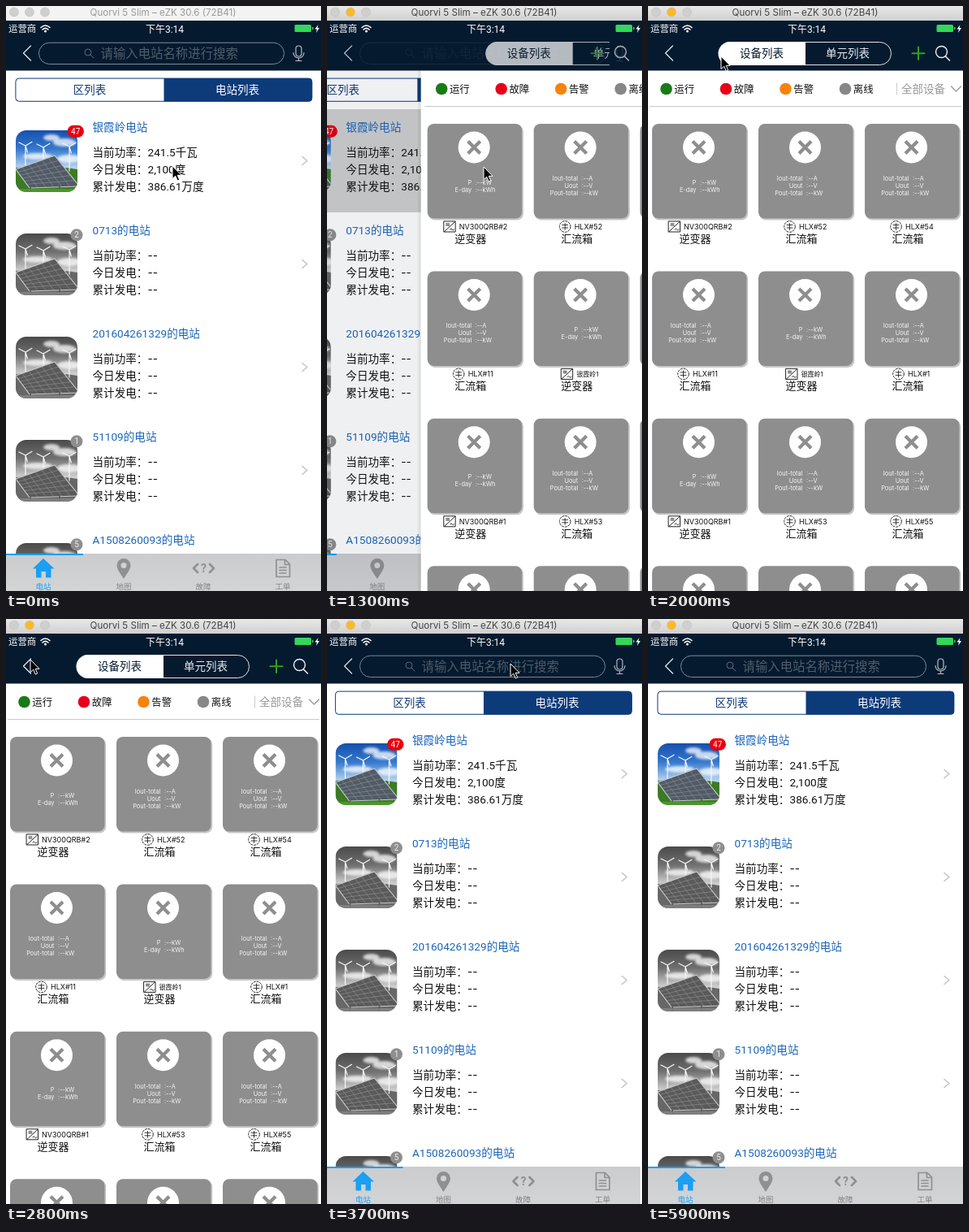
Write an HTML page that moves like this. It is 388 by 720 pixels and loops after 6000 ms.

```html
<!DOCTYPE html>
<html lang="zh-CN">
<head>
<meta charset="utf-8">
<title>Station list</title>
<style>
html, body { margin: 0; width: 100%; height: 100%; overflow: hidden; background: #fff }
svg { display: block; font-family: Roboto, "Noto Sans CJK SC", "Noto Sans CJK", sans-serif }
.ui { font-family: Inter, "Noto Sans CJK SC", "Noto Sans CJK", sans-serif }
.line { fill: none; stroke-linecap: round; stroke-linejoin: round }
.grey { filter: grayscale(1) }
.soft { filter: blur(1.6px) }
</style>
</head>
<body>
<svg id="stage" width="388" height="720" viewBox="0 0 388 720"></svg>
<script>
const NAVY = '#051a2f', BLUE = '#0d3b7a', GREY = '#8e8e8e';

const text = (x, y, s, size, fill = '#111', extra = '') =>
  `<text x="${x}" y="${y}" font-size="${size}" fill="${fill}" ${extra}>${s}</text>`;
const mid = (x, y, s, size, fill, extra = '') => text(x, y, s, size, fill, `text-anchor="middle" ${extra}`);
const end = (x, y, s, size, fill, extra = '') => text(x, y, s, size, fill, `text-anchor="end" ${extra}`);
const rect = (x, y, w, h, fill, extra = '') =>
  `<rect x="${x}" y="${y}" width="${w}" height="${h}" fill="${fill}" ${extra}/>`;
const dot = (x, y, r, fill, extra = '') => `<circle cx="${x}" cy="${y}" r="${r}" fill="${fill}" ${extra}/>`;
const line = (d, stroke, width = 1) => `<path class="line" d="${d}" stroke="${stroke}" stroke-width="${width}"/>`;
const group = (x, y, body, extra = '') => `<g transform="translate(${x} ${y})" ${extra}>${body}</g>`;

const turbine = (x, y, r, foot) =>
  line(`M${x} ${y}V${foot}M${x} ${y}l${-r} ${-r * .5}M${x} ${y}l${r} ${-r * .6}M${x} ${y}l${r * .3} ${r}`, '#f4f8ff', 1.2);
const cloud = (x, y, rx, ry) => `<ellipse cx="${x}" cy="${y}" rx="${rx}" ry="${ry}" fill="#fff" opacity=".75"/>`;

function photo() {
  let cells = '';
  for (let i = 1; i < 6; i++) {
    const k = i / 6;
    cells += `M${48 * k} ${48 - 17 * k}L${17 + 59 * k} ${70 - 2 * k}M${17 * k} ${48 + 22 * k}L${48 + 28 * k} ${31 + 37 * k}`;
  }
  return rect(0, 0, 76, 76, 'url(#sky)') +
    `<g class="soft">${cloud(44, 9, 10, 4) + cloud(60, 15, 14, 5) + cloud(27, 32, 18, 4) + cloud(66, 35, 15, 5)}</g>` +
    '<path d="M0 46Q40 42 76 48V76H0Z" fill="#3c7a24"/>' +
    turbine(12, 19, 8, 47) + turbine(34, 21, 8, 37) + turbine(66, 20, 8, 50) +
    '<path d="M0 48L48 31 76 66V69L17 71Z" fill="#525b65"/>' +
    line(cells, '#8a949e', .6) + line('M0 48L48 31 76 66M0 48L17 71 76 69', '#c3cad0', 1.2) +
    line('M18 71V76M54 70V76', '#565d58', 2) + rect(0, 72, 76, 4, '#56ab2d', 'opacity=".6"');
}

function listRow(title, badge, values, i) {
  const labels = ['当前功率：', '今日发电：', '累计发电：'];
  let s = group(12, 153, '<use href="#photo"/>', i ? 'class="grey"' : '');
  if (badge) {
    s += i ? dot(87, 154.7, 7.5, GREY) : rect(75.5, 146.7, 20.5, 15, '#e8000f', 'rx="7.5"');
    s += mid(i ? 87 : 85.7, 158, badge, 10, i ? '#eee' : '#fff');
  }
  s += text(106.5, 154, title, 13.6, '#1c66b8');
  labels.forEach((label, n) => {
    const y = 185 + 21 * n;
    s += text(106.5, y, label, 13.6) + text(174.5, y, values ? values[n] : '--', 13.6, '#111', values ? '' : 'class="ui"');
  });
  return group(0, 127 * i, s + line('M365 185.5L370.8 190.5 365 195.5', '#c4c4c8', 1.6));
}

function tabBar() {
  const ink = '#909092';
  const names = ['电站', '地图', '故障', '工单'];
  return rect(0, 674, 388, 46, 'url(#bar)') + rect(0, 674, 95, 2, '#1a9ff2') +
    '<path d="M46 680L59.500 692.500H55.500V703.500H49V696H43.500V703.500H37V692.500H33Z" fill="#1a9ff2"/>' +
    `<path d="M145 705C140 697 136.500 693 136.500 688.500a8.500 8.500 0 0 1 17 0C153.500 693 150 697 145 705Z" fill="${ink}"/>` +
    dot(145, 688.500, 3.500, '#d0d1d3') +
    line('M236 687L231 692 236 697M251 687L256 692 251 697', ink, 2.6) + mid(243.5, 697, '?', 14, ink, 'font-weight="700"') +
    line('M333 681.500H344L349.500 687V702.500H333ZM343.500 682V687.500H349M337 691H345M337 694.500H345M337 698H345', ink, 1.7) +
    names.map((s, i) => mid([46, 145, 243, 341][i], 718.3, s, 9.5, i ? '#858587' : '#1a9ff2')).join('');
}

function listPage() {
  const rows = [
    ['银霞岭电站', '47', ['241.5千瓦', '2,100度', '386.61万度']],
    ['0713的电站', '2'], ['201604261329的电站', ''], ['51109的电站', '1'], ['A1508260093的电站', '5']
  ];
  return rect(0, 79, 388, 641, '#fff') + rect(0, 127, 388, 127, '#cfcfcf', 'id="picked"') +
    rect(11.9, 89.1, 365, 28.2, '#fff', `rx="4" stroke="${BLUE}"`) +
    `<path d="M194.500 89H373a4 4 0 0 1 4 4V113.500a4 4 0 0 1-4 4H194.500Z" fill="${BLUE}"/>` +
    mid(103, 108, '区列表', 13.5, '#123a75') + mid(285, 108, '电站列表', 13.5, '#fff') +
    rows.map(([title, badge, values], i) => listRow(title, badge, values, i)).join('') + tabBar() +
    rect(0, 79, 388, 641, '#00103a', 'id="dim"');
}

function card(device, i) {
  const [name, width, inverter] = device;
  const readings = inverter ? [['P', 'kW'], ['E-day', 'kWh']] : [['Iout-total', 'A'], ['Uout', 'V'], ['Pout-total', 'kW']];
  const left = 58 - (width + 19) / 2, top = inverter ? 74.5 : 70;
  let s = rect(1.2, 1.5, 117, 117, '#c6c6c6', 'rx="8"') + rect(0, 0, 116.5, 116.5, GREY, 'rx="8"') +
    dot(57.5, 29, 19.5, '#fff') + `<path d="M50 21.500L65 36.500M65 21.500L50 36.500" stroke="${GREY}" stroke-width="4.2"/>`;
  readings.forEach(([label, unit], n) => {
    s += end(54.5, top + 9 * n, label, 7.4, '#f4f4f4', 'class="ui"') +
      text(59, top + 9 * n, ':--' + unit, 7.4, '#f4f4f4', 'class="ui"');
  });
  s += group(left, 119.5, inverter
    ? line('M.5 .5H14.500V13.500H.5ZM1 13L14 1M3 3.500H7M3 5.500H7M8 10.500q1.500-2 2.500 0t2.500 0', '#222')
    : dot(7.5, 7, 6.8, 'none', 'stroke="#222" stroke-dasharray="3 1"') + line('M4 5H11M4 8.500H11M7.500 3V11', '#222', .9));
  s += text(left + 19, 130, name, inverter && width < 40 ? 8 : 9, '#111', 'class="ui"') +
    mid(53, 146, inverter ? '逆变器' : '汇流箱', 13);
  return group(5 + 131 * (i % 3), 145 + 181.4 * Math.floor(i / 3), s);
}

function detailPage() {
  const box = n => ['HLX#' + n, n > 9 ? 35 : 29, false];
  const inverter = n => ['NV300QRB#' + n, 57, true];
  const devices = [inverter(2), box(52), box(54), box(11), ['银霞岭1', 30, true], box(1),
    inverter(1), box(53), box(55), box(12), box(13), box(14)];
  const legend = [['运行', '#1b7a18'], ['故障', '#e60019'], ['告警', '#f5840c'], ['离线', '#878787']];
  return rect(-8, 79, 5, 641, 'url(#edge)', 'id="shadow"') + rect(-3, 79, 400, 641, '#fff') +
    legend.map(([s, c], i) => dot(22.5 + 73.5 * i, 102, 7.3, c) + text(32.3 + 73.5 * i, 106.8, s, 12.4)).join('') +
    line('M306.500 95V109', '#ccc') + text(312, 107, '全部设备', 13.5, '#999') +
    line('M373.500 99L379.500 105 385.500 99', '#999', 1.3) + rect(2, 123, 384, 1.2, '#cdcdcd') +
    devices.map(card).join('');
}

const back = line('M30.500 49L21.500 58 30.500 67', '#dfe5ec', 1.3);

const searchNav = () => back +
  rect(40.5, 45.2, 302, 26.3, 'none', 'rx="13" stroke="#7c8a9a"') +
  dot(101, 57, 4, 'none', 'stroke="#5c6977"') + line('M104 60L108 64', '#5c6977') +
  text(116.5, 63.7, '请输入电站名称进行搜索', 15.4, '#505d6b') +
  rect(357, 49, 7, 13, 'none', 'rx="3.5" stroke="#b4bdc8" stroke-width="1.2"') +
  line('M354 57.500a6.500 6.500 0 0 0 13 0M360.500 64V67.500M357 67.500H364', '#b4bdc8', 1.2);

const detailNav = () => back +
  '<g clip-path="url(#navClip)"><g id="tabs">' +
  rect(87.5, 44.5, 212, 28, 'none', 'rx="14" stroke="#dfe5ec"') +
  '<path d="M194 44H101a14.500 14.500 0 0 0 0 29H194Z" fill="#fff"/>' +
  mid(140, 63, '设备列表', 13.5, NAVY) + mid(246, 63, '单元列表', 13.5, '#e8edf2') + '</g></g>' +
  line('M333 50.500V66M325.500 58.200H340.500', '#30a022', 2) +
  dot(361.5, 56.5, 7, 'none', 'stroke="#eef2f6" stroke-width="1.4"') + line('M366.500 62L371.500 67', '#eef2f6', 1.5);

const statusBar = () =>
  text(3, 32.3, '运营商', 11.4, '#fff') + mid(195.5, 32.5, '下午3:14', 12, '#fff') +
  line('M43 26.500Q48.500 21.500 54 26.500M45 29Q48.500 25.800 52 29', '#fff', 1.6) + dot(48.5, 31, 1.5, '#fff') +
  rect(355.5, 23, 20.5, 9, '#35d65b', 'rx="1.5"') + rect(377, 26, 1.5, 3, '#35d65b') +
  '<path d="M384.500 23L380.500 28.500H383L382 33 386 27H383.500Z" fill="#fff"/>';

const titleBar = () => rect(0, 0, 388, 18, '#f3f3f3') + rect(0, 0, 388, 18, 'url(#chrome)', 'id="focus"') +
  [10, 29, 48].map((x, i) => dot(x, 7.5, 5.5, '#cfcfcf', `stroke="#c0c0c0" stroke-width=".6" ${i === 1 ? 'id="light"' : ''}`)).join('') +
  mid(193.5, 12, 'Quorvi 5 Slim – eZK 30.6 (72B41)', 11.6, '#999', 'class="ui" id="caption"');

const gradient = (id, x2, y2, ...stops) => `<linearGradient id="${id}" x2="${x2}" y2="${y2}">` +
  stops.map(([at, c, o = 1]) => `<stop offset="${at}" stop-color="${c}" stop-opacity="${o}"/>`).join('') + '</linearGradient>';

const $ = id => document.getElementById(id);
$('stage').innerHTML = '<defs>' +
  gradient('sky', 0, 1, [0, '#1650ae'], [.3, '#3478cc'], [.6, '#b5d3ee']) +
  gradient('chrome', 0, 1, [0, '#e8e8e8'], [1, '#d0d0d0']) +
  gradient('bar', 0, 1, [0, '#cbccce'], [1, '#d3d4d6']) +
  gradient('edge', 1, 0, [0, '#000', 0], [1, '#000', .15]) +
  '<clipPath id="round"><rect width="76" height="76" rx="13"/></clipPath>' +
  '<clipPath id="navClip"><rect x="0" y="40" width="348" height="36"/></clipPath>' +
  `<g id="photo" clip-path="url(#round)">${photo()}</g></defs>` +
  `<g id="list">${listPage()}</g><g id="detail">${detailPage()}</g>` +
  rect(0, 18, 388, 61.5, NAVY) + `<g id="searchNav">${searchNav()}</g><g id="detailNav">${detailNav()}</g>` +
  statusBar() + titleBar() +
  '<path id="cursor" d="M0 0V15.500L3.700 12.200 6.200 18 8.700 17 6.200 11.300H11Z" fill="#000" stroke="#fff" stroke-width="1"/>';

// Pointer stops: time, x, y
const stops = [[0, 205, 197], [700, 193, 198], [1400, 193, 198], [2000, 90, 62], [2600, 30, 50],
  [3300, 30, 50], [3700, 226, 55], [4300, 179, 59], [5000, 179, 59], [5600, 179, -25], [6000, 179, -25]];
const PUSH = 1180, POP = 3265, RATE = .01;

function pointer(t) {
  const i = stops.findIndex(s => s[0] > t);
  const [t0, x0, y0] = stops[i - 1], [t1, x1, y1] = stops[i];
  const k = (t - t0) / (t1 - t0), e = k * k * (3 - 2 * k);
  return [x0 + (x1 - x0) * e, y0 + (y1 - y0) * e];
}

// 0 shows the list, 1 the detail page
function progress(t) {
  if (t < PUSH || t > 4000) return 0;
  if (t < POP) return t > 1950 ? 1 : 1 - Math.exp(-RATE * (t - PUSH));
  return Math.exp(-RATE * (t - POP));
}

const move = (id, x, y = 0) => $(id).setAttribute('transform', `translate(${x} ${y})`);
const fade = (id, o) => $(id).setAttribute('opacity', o);

function draw(t) {
  const q = progress(t), pushing = t < POP, active = t >= 600;
  move('list', -119 * q);
  move('detail', q ? 394 * (1 - q) : 400);
  fade('dim', .09 * q);
  fade('shadow', q);
  fade('picked', t >= 1050 && pushing ? 1 : 0);
  fade('searchNav', (1 - q) ** (pushing ? 1.5 : 3));
  fade('detailNav', q ** (pushing ? 1 : 2.3));
  move('tabs', (pushing ? 361 : 234) * (1 - q));
  move('cursor', ...pointer(t));
  fade('focus', active ? 1 : 0);
  $('light').setAttribute('fill', active ? '#fbb924' : '#cfcfcf');
  $('caption').setAttribute('fill', active ? '#444' : '#999');
}

function tick() {
  draw(Math.floor(performance.now() % 6000 / 100) * 100);
  requestAnimationFrame(tick);
}
tick();
</script>
</body>
</html>
```
